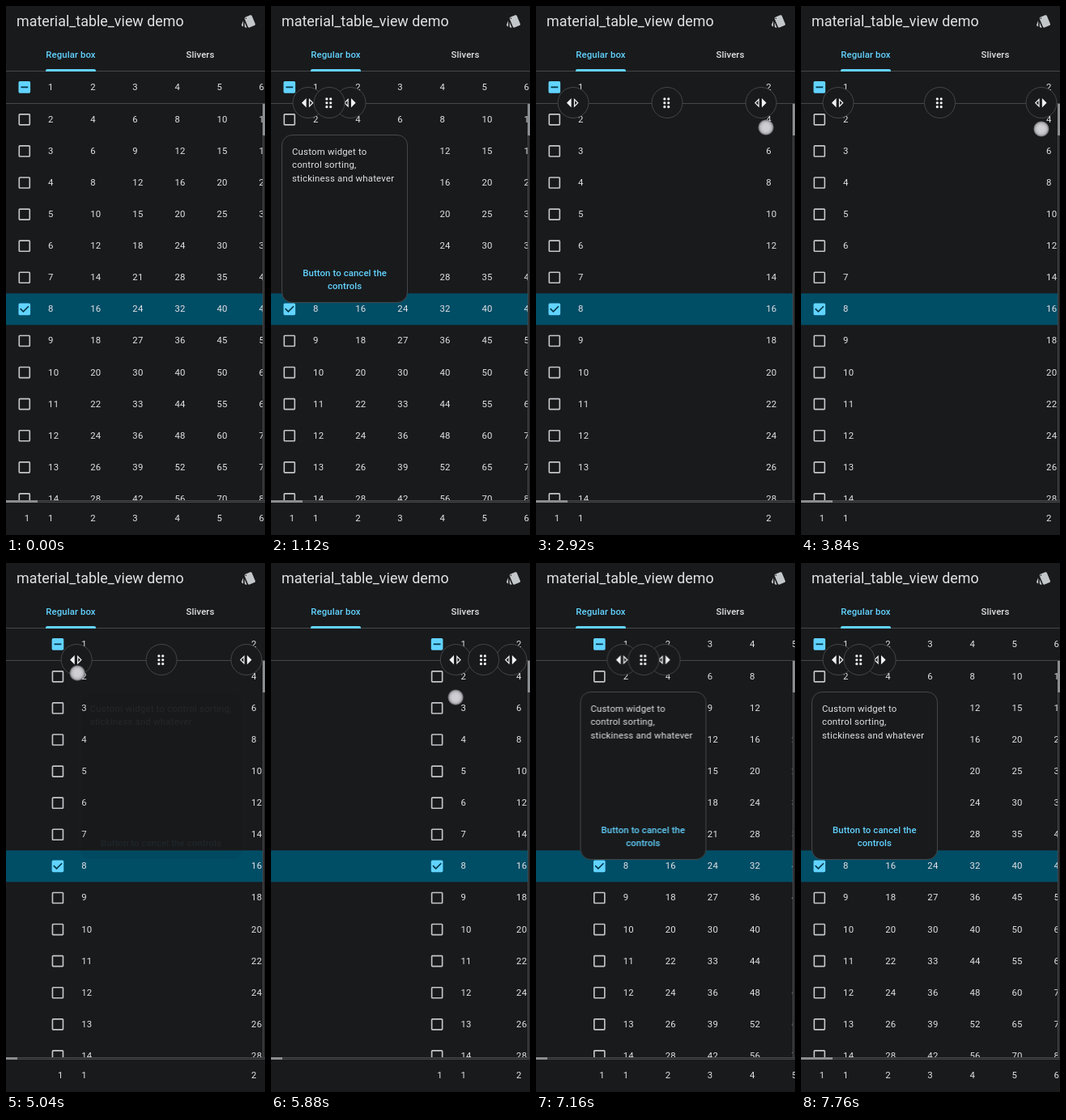
An HTML page that plays this animation: 320 by 654 pixels, repeating every 7.8 s.

```html
<!DOCTYPE html>
<html lang="en">
<head>
<meta charset="utf-8">
<title>Table view demo</title>
<style>
@property --off { syntax: "<length>"; inherits: true; initial-value: 0px; }
@property --w { syntax: "<length>"; inherits: true; initial-value: 52.1px; }

html, body { margin: 0; width: 100%; height: 100%; overflow: hidden; background: #191a1c; }
#stage {
  --bg: #191a1c; --fg: #e1e2e5; --accent: #62d3ff; --line: #44474a;
  --left: calc(45.5px + var(--off));
  --mid: calc(var(--left) + var(--w) / 2);
  position: relative; width: 320px; height: 654px; overflow: hidden;
  background: var(--bg); color: var(--fg);
  font: 11.4px/16.3px Roboto, sans-serif; letter-spacing: .2px;
  animation: resize 7.8s linear infinite;
}
#stage div, #stage span, #stage svg { position: absolute; box-sizing: border-box; }

.title { left: 13px; top: 7px; font-size: 17.9px; line-height: 24px; letter-spacing: 0; white-space: nowrap; }
.style { left: 290.3px; top: 9px; width: 19.5px; height: 19.5px; fill: #c4c7ca; }
.tab { top: 50px; width: 160px; line-height: 21px; text-align: center; font-weight: 500; letter-spacing: .08px; }
.tab.on { color: var(--accent); }
.ink { left: 49px; top: 78px; width: 62px; height: 3px; border-radius: 2px 2px 0 0; background: var(--accent); }
.rule { left: 0; width: 320px; height: 1px; background: var(--line); }

.body { left: 0; top: 121px; width: 320px; height: 492px; overflow: hidden; }
.row { left: 0; top: 0; width: 320px; height: 39.09px; line-height: 39.09px; white-space: nowrap; }
.row.sel { background: #004d66; }
.row > * { transform: translateX(var(--off)); }
.row > .rest { transform: translateX(calc(var(--off) + var(--w) - 52.1px)); }
#stage .box { left: 0; top: 0; width: 45.6px; height: 39.09px; fill: none; stroke: #c4c7ca; stroke-width: 2; }
#stage .box.full { fill: var(--accent); stroke: var(--accent); }
.box path { fill: none; stroke: #003546; }

.thumb { background: #8b8e90; }
.track { background: #292a2c; border: 0 solid #45474a; }

.controls { inset: 0; animation: controls 7.8s linear infinite; }
.knob {
  left: -19.5px; top: 100px; width: 39px; height: 39px; transform: translateX(var(--x));
  border: 1px solid #44474a; border-radius: 50%; background: var(--bg);
}
.knob svg { left: 8.75px; top: 8.75px; width: 19.5px; height: 19.5px; fill: #f0f1f3; }
.popup {
  --pw: min(var(--w) + 104.2px, 202px);
  top: 159px; height: 207.5px; width: var(--pw);
  left: clamp(13px, var(--mid) - var(--pw) / 2, 307px - var(--pw));
  padding: 12px; border: 1px solid #44474a; border-radius: 13px; background: var(--bg);
  animation: popup 7.8s linear infinite;
}
.popup b {
  position: absolute; left: 21px; right: 21px; bottom: 11px;
  text-align: center; font-weight: 500; letter-spacing: .08px; color: var(--accent);
}
.touch {
  left: -10px; top: -10px; width: 20px; height: 20px; border-radius: 50%;
  background: radial-gradient(closest-side, #cfcfd3 40%, #bababf 70%, #85858b 88%, #50505600);
  animation: move 7.8s linear infinite, press 7.8s linear infinite;
}

/* right edge drag, left edge drag, then spring back */
@keyframes resize {
  0%, 23.077% { --off: 0px; --w: 52.1px; animation-timing-function: cubic-bezier(.4, 0, .8, .7); }
  27.692% { --off: 0px; --w: 76px; }
  37.436% { --off: 0px; --w: 232px; animation-timing-function: ease-out; }
  42.05%, 62.051% { --off: 0px; --w: 251px; }
  64.615% { --off: 41px; --w: 210px; }
  75.385% { --off: 182.2px; --w: 68.8px; animation-timing-function: ease-out; }
  77.949%, 87.949% { --off: 198.9px; --w: 52.1px; }
  88.718% { --off: 181px; --w: 52.1px; }
  89.744% { --off: 133px; --w: 52.1px; }
  90.769% { --off: 88.6px; --w: 52.1px; }
  91.795% { --off: 55.8px; --w: 52.1px; }
  93.077% { --off: 29.7px; --w: 52.1px; }
  94.359% { --off: 15.3px; --w: 52.1px; }
  96.154% { --off: 5.7px; --w: 52.1px; }
  98.205% { --off: 1.5px; --w: 52.1px; }
  99.487%, 100% { --off: 0px; --w: 52.1px; }
}
/* the overlay trails the table a little while it springs back */
@keyframes controls {
  0%, 7.2% { opacity: 0; transform: none; }
  9.7%, 87.949% { opacity: 1; transform: none; }
  89.5% { opacity: 1; transform: translateX(9px); }
  91.795% { opacity: 1; transform: translateX(5.5px); }
  96%, 99.99% { opacity: 1; transform: none; }
  100% { opacity: 0; transform: none; }
}
@keyframes popup {
  0%, 22.8% { opacity: 1; }
  25.6%, 51.8% { opacity: 0; }
  54.6%, 62% { opacity: 1; }
  64.8%, 88.2% { opacity: 0; }
  91%, 100% { opacity: 1; }
}
@keyframes move {
  0%, 10% { transform: translate(66px, 102px); }
  10.01%, 21.8% { transform: translate(100px, 120px); }
  23.077% { transform: translate(104px, 121px); animation-timing-function: cubic-bezier(.4, 0, .8, .7); }
  27.692% { transform: translate(132px, 125px); }
  37.436% { transform: translate(284px, 150px); animation-timing-function: ease-out; }
  42.05% { transform: translate(300px, 152px); }
  51.3%, 55% { transform: translate(296px, 152px); }
  55.01%, 60.8% { transform: translate(45px, 124px); }
  62.051% { transform: translate(47px, 126px); }
  64.615% { transform: translate(88px, 136px); }
  75.385% { transform: translate(228px, 166px); animation-timing-function: ease-out; }
  77.949% { transform: translate(246px, 169px); }
  82%, 100% { transform: translate(252px, 170px); }
}
@keyframes press {
  0%, 5.6% { opacity: 0; }
  6.2%, 7.7% { opacity: 1; }
  8.5%, 21.6% { opacity: 0; }
  22.3%, 51.3% { opacity: 1; }
  52.3%, 60.8% { opacity: 0; }
  61.5%, 87.9% { opacity: 1; }
  89%, 100% { opacity: 0; }
}
</style>
</head>
<body>
<div id="stage">
  <div class="title">material_table_view demo</div>
  <svg class="style" viewBox="0 0 24 24"><path d="M2.53 19.65l1.34.56v-9.03l-2.43 5.86c-.41 1.02.08 2.19 1.09 2.61zm19.5-3.7L17.07 3.98c-.31-.75-1.04-1.21-1.81-1.23-.26 0-.53.04-.79.15L7.1 5.95c-.75.31-1.21 1.03-1.23 1.8-.01.27.04.54.15.8l4.96 11.97c.31.76 1.05 1.22 1.83 1.23.26 0 .52-.05.77-.15l7.36-3.05c1.02-.42 1.51-1.59 1.09-2.6zM7.88 8.75c-.55 0-1-.45-1-1s.45-1 1-1 1 .45 1 1-.45 1-1 1zm-2 11c0 1.1.9 2 2 2h1.45l-3.45-8.34v6.34z"/></svg>
  <div class="tab on" style="left:0">Regular box</div>
  <div class="tab" style="left:160px">Slivers</div>
  <div class="rule" style="top:80px"></div>
  <div class="ink"></div>

  <div id="head"></div>
  <div class="body" id="rows"></div>
  <div id="foot"></div>

  <div class="track" style="left:317px;top:121px;width:3px;height:492px;border-left-width:1px"></div>
  <div class="track" style="left:0;top:611px;width:320px;height:3px;border-top-width:1px"></div>
  <div class="rule" style="top:120px"></div>
  <div class="rule" style="top:613px"></div>
  <div class="thumb" style="left:317px;top:121px;width:3px;height:39px"></div>
  <div class="thumb" style="left:0;top:611px;width:max(14px, 39px - var(--off));height:3px"></div>

  <div class="controls">
    <div class="knob" style="--x:var(--left)"><svg viewBox="0 0 24 24"><path d="M15.5 15.38V8.62L18.88 12l-3.38 3.38M14 19l7-7-7-7v14zm-4 0V5l-7 7 7 7z"/></svg></div>
    <div class="knob" style="--x:calc(var(--left) + var(--w))"><svg viewBox="0 0 24 24"><path d="M8.5 8.62v6.76L5.12 12 8.5 8.62M10 5l-7 7 7 7V5zm4 0v14l7-7-7-7z"/></svg></div>
    <div class="knob" style="--x:var(--mid)"><svg viewBox="0 0 24 24"><path d="M9 6h0M15 6h0M9 12h0M15 12h0M9 18h0M15 18h0" stroke="#f0f1f3" stroke-width="4" stroke-linecap="round"/></svg></div>
    <div class="popup">Custom widget to control sorting, stickiness and whatever<b>Button to cancel the controls</b></div>
  </div>
  <div class="touch"></div>
</div>
<script>
const ROW = 39.09, COL = 52.1, COLS = 6;
// 56 x 48 cell with an 18-unit box in its middle
const box = d => `<svg class="box ${d ? 'full' : ''}" viewBox="0 0 56 48"><g transform="translate(19 15)">
  <rect x="1" y="1" width="16" height="16" rx="1"/><path d="${d}"/></g></svg>`;
const empty = box('');
const dash = box('M3.6 9H14.4');
const tick = box('M2.7 8.1L7.2 12.6L15.3 4.5');

function row(n, top, lead, cls = '') {
  let cells = '';
  for (let k = 1; k <= COLS; k++) {
    const x = 52.1 + COL * (k - 1);
    cells += `<span class="${k > 1 ? 'rest' : ''}" style="left:${x.toFixed(1)}px">${n * k}</span>`;
  }
  return `<div class="row ${cls}" style="transform:translateY(${top.toFixed(2)}px)">${lead}${cells}</div>`;
}

head.innerHTML = row(1, 80.8, dash);
foot.innerHTML = row(1, 614.4, '<span style="left:22.8px">1</span>');
for (let n = 2; n <= 14; n++) {
  const on = n === 8;
  rows.innerHTML += row(n, ROW * (n - 2) - .2, on ? tick : empty, on ? 'sel' : '');
}
</script>
</body>
</html>
```
